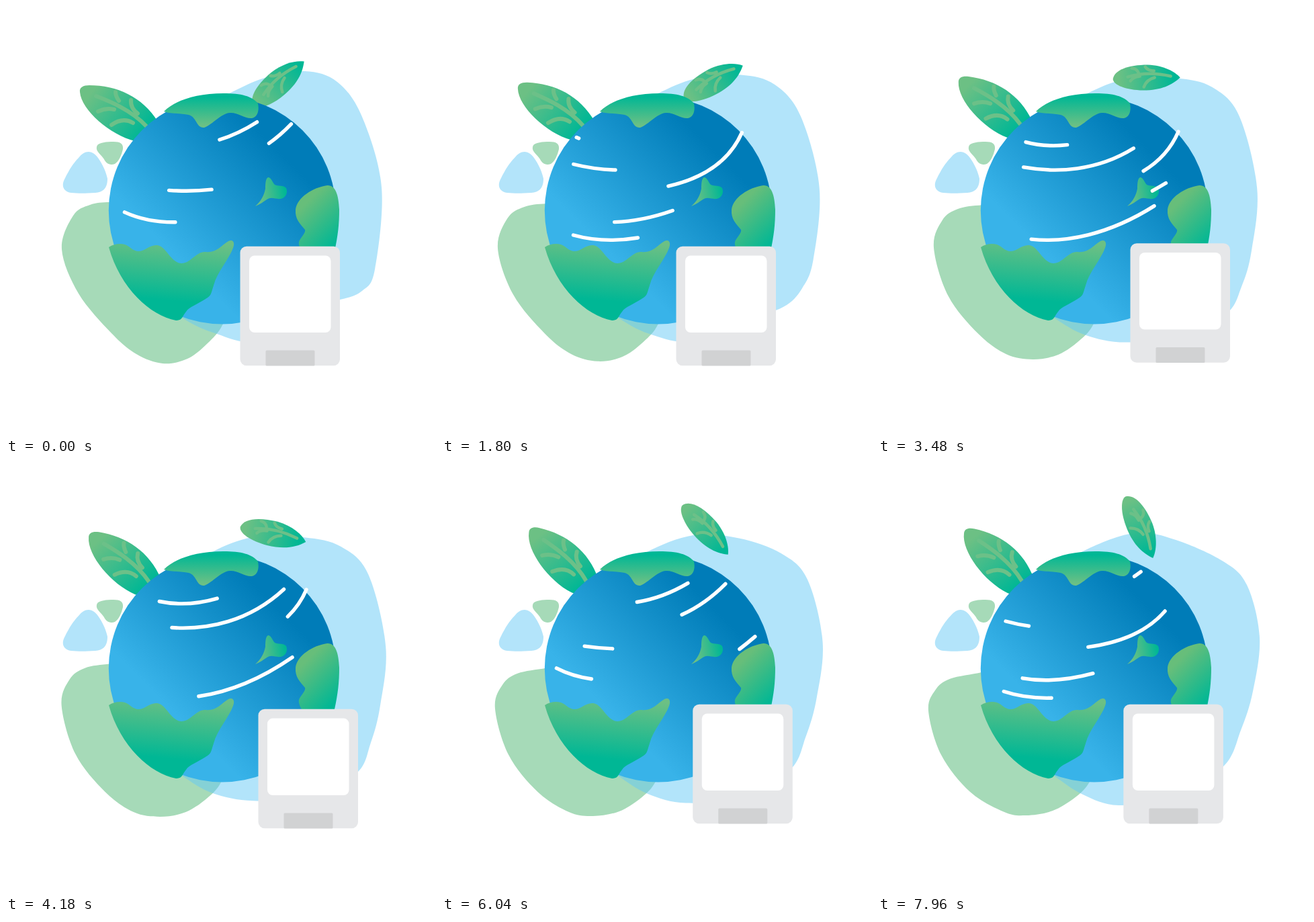
These frames come from a looping animation (640x640 px, 8000 ms). An HTML page:

```html
<!DOCTYPE html>
<html lang="en">
<head>
<meta charset="utf-8">
<title>Green planet</title>
<style>
  html, body { margin: 0; width: 100%; height: 100%; overflow: hidden; background: #fff; }
  svg { display: block; width: 100%; height: 100%; }
  .vein, #wind { fill: none; stroke-linecap: round; stroke-linejoin: round; }
  .vein { stroke: #6cc088; }
  #wind { stroke: #fff; stroke-width: 5.4; }
</style>
</head>
<body>
<svg viewBox="0 0 640 640">
  <defs id="defs"></defs>

  <path id="greenBlob" fill="#a6dab8"/>
  <path id="blueBlob" fill="#67c9f5" fill-opacity=".5"/>
  <path fill="#b3e4fa" d="M108 226C118 213 130 214 139 229C146 240 149 248 151 257C151 272 144 277 133 278C118 279 107 279 97 278C84 276 82 266 88 256C94 244 100 234 108 226Z"/>
  <path fill="#a6dab8" d="M135.500 208C138 203 150 202 160 202C170 202 175 205 174 213C172 222 168 231 162 235C156 237 151 236 147 230C143 221 132 217 135.500 208Z"/>

  <g id="leftLeaf">
    <path fill="url(#leafL)" d="M110 128C109 121 115 118 124 118C165 118 203 135 226 172L235 200C225 205 205 203 192 201C155 192 112 155 110 128Z"/>
    <path class="vein" stroke-width="6" d="M134 134C152 141 186 154 209 179M163 128Q163 134 168 141M186 140Q185 152 196 160M137 157Q149 151 161 154M157 177Q174 165 189 174"/>
  </g>
  <g id="rightLeaf">
    <path fill="url(#leafR)" d="M-50 1C-48 -12 -28 -20 2 -20C25 -19 42 -10 50 -1C38 10 22 18 -5 18C-30 18 -50 10 -50 1Z"/>
    <path class="vein" stroke-width="4.500" d="M-28 -2C-5 -9 15 -8 36 -3M-22 -15Q-14 -14 -12 -8M-2 -17Q2 -11 11 -11M-24 4Q-20 -2 -10 -3M-4 13Q0 2 12 -1"/>
  </g>

  <circle cx="321.800" cy="304.500" r="169" fill="url(#sea)"/>
  <path fill="url(#north)" d="M235 157C250 142 280 130 324 130C350 130 366 134 375 145C377 155 375 165 366 167C355 168 345 158 333 159C320 160 308 176 295 181C283 182 284 165 272 162C258 159 245 161 235 157Z"/>
  <path fill="url(#south)" d="M153 359C160 354 170 353 177 355C185 358 189 365 197 365C207 365 214 355 225 356C238 357 245 382 261 383C275 383 283 365 297 366C313 368 321 356 331 350C338 347 341 352 338 360C332 377 314 396 309 416C305 428 306 431 297 436C285 444 272 448 268 455C262 462 263 468 253 468C215 461 170 420 153 359Z"/>
  <path fill="url(#east)" d="M431 303C433 285 457 270 478 267C490 266 495 280 496 303C496 325 494 342 489 365L440 365C436 358 434 352 438 347C443 340 446 336 445 333C438 324 430 318 431 303Z"/>
  <path fill="url(#isle)" d="M371 298C380 290 384 282 386 272C386 262 387 255 391 255C395 256 397 263 400 266C405 269 413 266 417 271C420 278 416 286 409 287C402 288 396 284 390 287C383 291 379 295 371 298Z"/>

  <g id="wind"></g>

  <g id="box">
    <rect x="348.500" y="357.700" width="148.500" height="177.500" rx="9.500" fill="#e6e7e9"/>
    <rect x="362" y="371.500" width="121.500" height="114.500" rx="8" fill="#fff"/>
    <rect x="386.500" y="512.500" width="73" height="23" rx="1.500" fill="#d1d2d3"/>
  </g>
</svg>
<script>
const LOOP = 8000, WIND_LOOP = 6620;
const $ = id => document.getElementById(id);
const lerp = (a, b, u) => a + (b - a) * u;
const swing = (t, half) => (1 - Math.cos(Math.PI * t / half)) / 2;

// Straight runs between [time, value] points
function track(keys, t) {
  const i = keys.findIndex(k => k[0] > t);
  if (i < 0) return keys[keys.length - 1][1];
  if (i === 0) return keys[0][1];
  const [t0, a] = keys[i - 1], [t1, b] = keys[i];
  return lerp(a, b, (t - t0) / (t1 - t0));
}

const LEAF = '#6cc084', TEAL = '#00b795';
const gradients = {
  sea: [253, 373, 408, 218, '#38b3e9', '#007cb8'],
  north: [325, 178, 325, 135, LEAF, TEAL],
  south: [270, 350, 262, 440, LEAF, TEAL],
  east: [448, 292, 500, 344, '#67be7a', TEAL],
  isle: [376, 282, 416, 276, LEAF, TEAL],
  leafL: [126, 130, 203, 190, LEAF, TEAL],
  leafR: [-42, 2, 40, -2, LEAF, TEAL]
};
$('defs').innerHTML = Object.entries(gradients).map(([id, [x1, y1, x2, y2, a, b]]) =>
  `<linearGradient id="${id}" gradientUnits="userSpaceOnUse" x1="${x1}" y1="${y1}" x2="${x2}" y2="${y2}">
    <stop stop-color="${a}"/><stop offset="1" stop-color="${b}"/></linearGradient>`).join('');

// Outlines at the start, middle and end of the loop; "hidden" closes them behind the globe
const blobs = {
  greenBlob: {
    shapes: [
      [155,292, 125,296, 100,312, 83,362, 108,428, 157,487, 194,518, 233,532, 270,525, 300,502, 322,475],
      [155,297, 118,303, 95,320, 83,359, 104,432, 148,488, 190,518, 230,525, 268,518, 300,497, 320,474],
      [155,310, 107,320, 85,337, 75,368, 94,433, 137,488, 188,518, 220,523, 260,516, 295,495, 315,473]
    ],
    hidden: [332,435, 290,340, 200,296]
  },
  blueBlob: {
    shapes: [
      [262,464, 308,486, 375,498, 455,442, 497,437, 530,424, 549,392, 559,270, 530,165, 493,113, 445,97, 385,107, 330,131],
      [262,464, 308,490, 368,501, 453,496, 522,461, 543,416, 557,360, 565,272, 539,164, 498,122, 444,109, 368,109, 307,131],
      [262,464, 305,492, 358,508, 440,495, 514,450, 540,396, 558,338, 568,258, 549,180, 512,144, 440,112, 380,103, 303,131]
    ],
    hidden: [260,165, 230,300, 195,395, 225,435]
  }
};

function closedPath(p) {
  const n = p.length / 2;
  const at = i => { const k = (i + n) % n * 2; return [p[k], p[k + 1]]; };
  let d = `M${at(0)}`;
  for (let i = 0; i < n; i++) {
    const [a, b, c, e] = [at(i - 1), at(i), at(i + 1), at(i + 2)];
    const c1 = b.map((v, k) => v + (c[k] - a[k]) / 6);
    const c2 = c.map((v, k) => v - (e[k] - b[k]) / 6);
    d += `C${c1} ${c2} ${c}`;
  }
  return d + 'Z';
}

function blobPath({ shapes, hidden }, t) {
  const half = t / LOOP * 2, i = half < 1 ? 0 : 1;
  const edge = shapes[i].map((v, k) => lerp(v, shapes[i + 1][k], half - i));
  return closedPath([...edge, ...hidden]);
}

// Each gust runs along one cubic; head and tail give the share of its width covered by age
const winds = [
  { start: 1700, curve: [[199,195], [240,214], [315,219], [393,159]],
    head: [[0,0], [3300,.79], [6400,1]], tail: [[0,0], [3220,.196], [6500,1]] },
  { start: 770, curve: [[183,232], [250,252], [350,256], [427,173]],
    head: [[0,0], [3150,.94], [6400,1]], tail: [[0,0], [2950,.15], [6450,1]] },
  { start: 5500, curve: [[205,270], [290,284], [410,274], [447,187]],
    head: [[0,0], [2600,.97], [2950,1]], tail: [[450,.01], [2920,.545], [6100,1]] },
  { start: 4750, curve: [[157,296], [220,338], [320,330], [431,262]],
    head: [[0,0], [5400,1]], tail: [[0,0], [2900,.11], [5600,1]] },
  { start: 6660, curve: [[164,329], [230,362], [345,362], [468,255]],
    head: [[0,0], [3400,.81], [6100,1]], tail: [[0,0], [3400,.2], [6300,1]] }
];

for (const w of winds) {
  w.el = document.createElementNS('http://www.w3.org/2000/svg', 'path');
  $('wind').append(w.el);
}

// Blossom of a cubic: equal arguments give a point, mixed ones the handles of a piece
const blossom = (points, ...us) => us.reduce((p, u) =>
  p.slice(1).map((b, i) => b.map((v, k) => lerp(p[i][k], v, u))), points)[0];

function paramAt(curve, share) {
  const x = lerp(curve[0][0], curve[3][0], share);
  let lo = 0, hi = 1;
  for (let i = 0; i < 16; i++) {
    const u = (lo + hi) / 2;
    if (blossom(curve, u, u, u)[0] < x) lo = u; else hi = u;
  }
  return (lo + hi) / 2;
}

function windPath({ start, curve, head, tail }, t) {
  const age = ((t - start) % WIND_LOOP + WIND_LOOP) % WIND_LOOP;
  const from = track(tail, age), to = track(head, age);
  if (to - from < 0.002) return '';
  const a = paramAt(curve, from), b = paramAt(curve, to);
  return `M${blossom(curve, a, a, a)}C${blossom(curve, a, a, b)} ${blossom(curve, a, b, b)} ${blossom(curve, b, b, b)}`;
}

const place = (id, transform) => $(id).setAttribute('transform', transform);

function draw(t) {
  for (const id in blobs) $(id).setAttribute('d', blobPath(blobs[id], t));
  for (const w of winds) w.el.setAttribute('d', windPath(w, t));

  place('leftLeaf', `rotate(${13.3 * swing(t, 6700)} 235 200)`);
  const s = swing(t, 8360);
  place('rightLeaf', `translate(${lerp(406, 389, s)} ${lerp(115.5, 94, s)}) rotate(${lerp(-40, 68, s)})`);

  const dx = track([[2300, 0], [3400, 27], [5500, 27], [8000, 16.7]], t);
  const dy = track([[2300, 0], [3480, -4.5], [4480, 12], [5070, 0]], t);
  place('box', `translate(${dx} ${dy})`);
}

// The motion is held in short uneven beats
const BEATS = [440, 360, 260, 120, 0], BAR = 560;
function held(t) {
  const rest = t % BAR;
  return t - rest + BEATS.find(b => b <= rest);
}

const began = performance.now();
let shown = -1;
function tick() {
  const t = held((performance.now() - began) % LOOP);
  if (t !== shown) draw(shown = t);
  requestAnimationFrame(tick);
}
tick();
</script>
</body>
</html>
```
